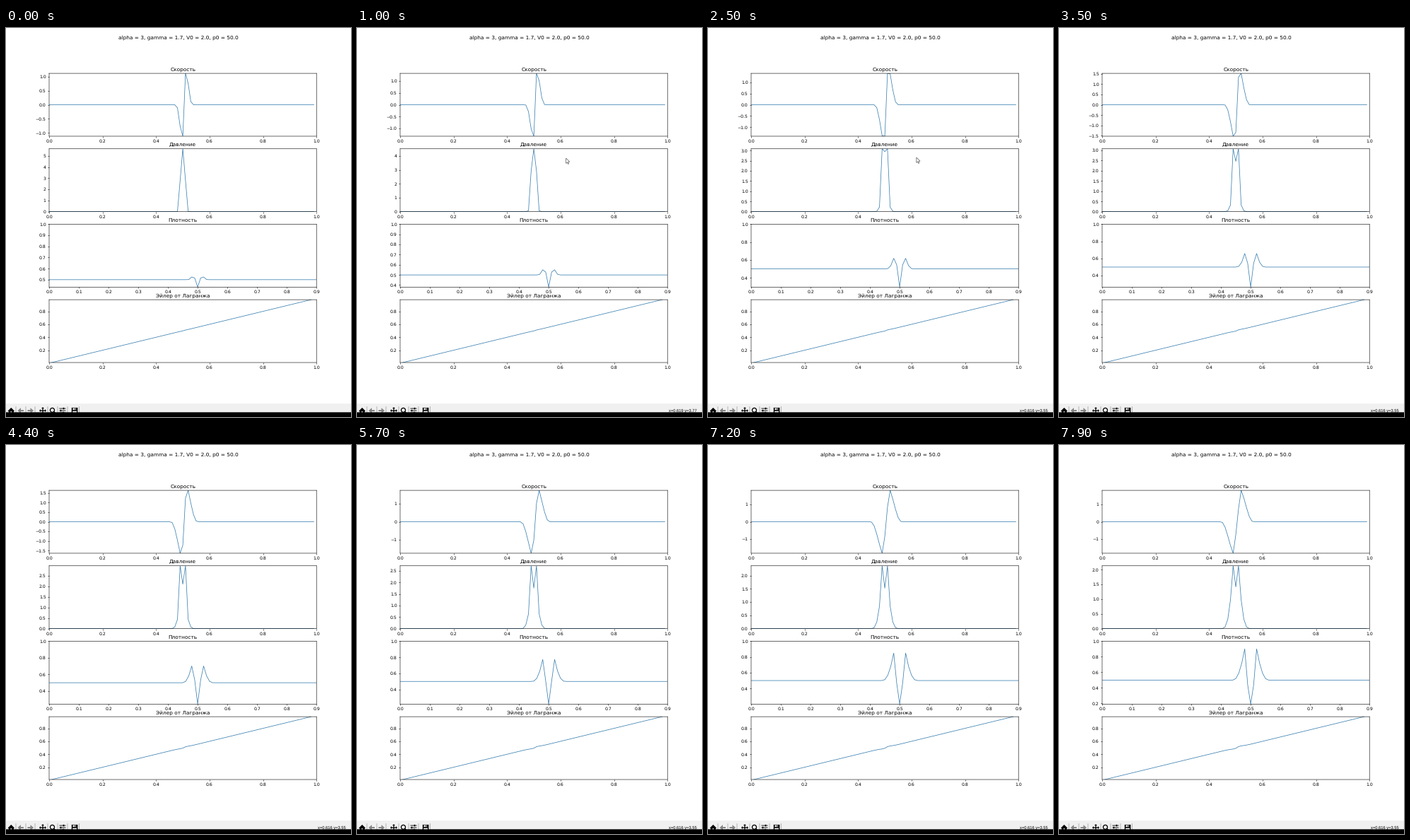
Animation, 488 px wide and 550 px high, one loop 8 s. Source, as a matplotlib script:

```python
import numpy as np
import matplotlib.pyplot as plt
from matplotlib.animation import FuncAnimation
from matplotlib.patches import Circle, Polygon, Rectangle

W, H, DPI = 488, 550, 64
PLOT_H = 531                 # plot area above the toolbar
K = 44.04 / DPI              # scale of the default style sizes
STEP_MS, FRAMES = 100, 80

plt.rcParams.update({
    "font.family": "DejaVu Sans", "font.size": 10 * K, "text.hinting": "none",
    "axes.linewidth": 0.95 * K, "axes.titlepad": 6 * K, "lines.linewidth": 1.25 * K,
    "path.snap": False,
    **{f"{a}tick.major.{p}": v * K for a in "xy"
       for p, v in (("size", 3.5), ("pad", 3.5), ("width", 0.95))},
})

# Point explosion in a gas, in Lagrangian cells with artificial viscosity
CELLS, CENTRE = 100, 50
GAMMA, RHO0, VISCOSITY = 1.7, .5, 5.3
STRETCH = .034               # time step over cell width
PUSH = STRETCH / RHO0
WARM_UP, SHOWN = 4, 18
FIRST_MS, UPDATE_MS = 100, 455


def simulate():
    """States (velocity, pressure, density) for every shown solver step."""
    volume = np.ones(CELLS)
    velocity = np.zeros(CELLS + 1)
    pressure = np.zeros(CELLS)
    pressure[CENTRE - 1:CENTRE + 2] = 2.65, 7.2, 2.65

    def viscosity():
        squeeze = np.minimum(np.diff(velocity), 0)
        return VISCOSITY * RHO0 / volume * squeeze ** 2

    velocity[1:-1] -= PUSH / 2 * np.diff(pressure)
    states = []
    for _ in range(WARM_UP + SHOWN + 1):
        states.append((velocity[:-1].copy(), pressure, RHO0 / volume))
        grown = volume + STRETCH * np.diff(velocity)
        ratio = volume / grown
        pressure = (pressure * ratio ** GAMMA
                    + (GAMMA - 1) * viscosity() * np.log(ratio))
        volume = grown
        velocity[1:-1] -= PUSH * np.diff(pressure + viscosity())
    return states[WARM_UP:]


STATES = simulate()
GRID = np.arange(CELLS) / CELLS

fig = plt.figure(figsize=(W / DPI, H / DPI), dpi=DPI, facecolor="white")
axes = fig.subplots(4, 1)
fig.subplots_adjust(left=.125, right=.9, hspace=.2,
                    top=1 - 64.1 / H, bottom=1 - 473 / H)
fig.suptitle("alpha = 3, gamma = 1.7, V0 = 2.0, p0 = 50.0",
             y=1 - .02 * PLOT_H / H)

lines = []
for ax, title, right in zip(
        axes, ("Скорость", "Давление", "Плотность", "Эйлер от Лагранжа"),
        (1, 1, .9, 1)):
    ax.set_title(title)
    ax.set_xlim(0, right)
    lines += ax.plot([], [], color="#397fb0")

# Pixel-space layer for the toolbar and pointer
stage = fig.add_axes([0, 0, 1, 1], zorder=5)
stage.set(xlim=(0, W), ylim=(H, 0))
stage.axis("off")


def px(size):
    return size * 72 / DPI


def rect(x, y, w, h, color):
    stage.add_patch(Rectangle((x, y), w, h, fc=color, lw=0))


def shape(points, color="black"):
    stage.add_patch(Polygon(points, fc=color, lw=0))


def stroke(xs, ys, color="black", width=1.0):
    stage.plot(xs, ys, color=color, lw=px(width), solid_capstyle="butt")


def toolbar():
    rect(0, PLOT_H, W, H - PLOT_H, "#f0f0f0")
    for x in (14, 28, 41, 59, 73, 87, 103.5):
        stroke([x, x], [535, 544], "#8c8c8c", .6)
    # home
    shape([(2.5, 541.5), (7.3, 536.8), (12, 541.5), (11, 542), (10.5, 546),
           (4, 546), (3.7, 542)])
    rect(6.5, 542, 1.6, 3, "#f0f0f0")
    # back and forward
    for x, d in ((21, 1), (34.5, -1)):
        shape([(x - 4.5 * d, 541), (x, 537), (x, 540), (x + 4 * d, 540),
               (x + 4 * d, 542), (x, 542), (x, 545)], "#858585")
    # pan
    stroke([48, 56], [541, 541], width=1.3)
    stroke([52, 52], [537, 545], width=1.3)
    for dx, dy in ((1, 0), (-1, 0), (0, 1), (0, -1)):
        shape([(52 + 5 * dx, 541 + 5 * dy),
               (52 + 3 * dx + 2 * dy, 541 + 3 * dy + 2 * dx),
               (52 + 3 * dx - 2 * dy, 541 + 3 * dy - 2 * dx)])
    # zoom
    stage.add_patch(Circle((65.5, 540.3), 3, fill=False, ec="black", lw=px(1.3)))
    stroke([67.5, 70.5], [542.3, 545.5], width=1.6)
    # sliders
    for y, knob in ((538, 81.5), (541, 77.5), (544, 81)):
        stroke([75.5, 84.5], [y, y], width=.9)
        rect(knob - .8, y - 1.3, 1.6, 2.6, "black")
    # save
    rect(92.8, 536.8, 8.6, 9, "black")
    rect(94.5, 537.5, 4.6, 2.4, "#f0f0f0")
    rect(94.2, 541.6, 5.8, 3.5, "#f0f0f0")
    rect(97.2, 537.8, 1.2, 1.8, "black")
    stage.add_patch(Rectangle((0, 543.3), W, 7, fc="black", lw=0, zorder=4))


toolbar()
status = stage.text(481, 541, "", ha="right", va="center",
                    family="Liberation Sans", fontsize=px(5.8))

ARROW = np.array([(0, 0), (0, 7.4), (1.7, 5.9), (2.9, 8.4), (4, 7.9),
                  (2.9, 5.4), (5.2, 5.2)])
pointer = Polygon(ARROW, fc="white", ec="#6c6c6c", lw=px(.8))
stage.add_patch(pointer)


def draw_pointer(ms):
    pointer.set_visible(700 <= ms < 3000)
    times = [700, 900, 1100, 1200]
    x = np.interp(ms, times, [425, 295.6, 295.6, 294.8])
    y = np.interp(ms, times, [112, 184, 184, 183])
    pointer.set_xy(ARROW + (x, y))
    status.set_text("" if ms < 800 else
                    "x=0.619 y=3.77" if ms < 1200 else "x=0.616 y=3.55")


def draw(i):
    ms = i * STEP_MS
    step = max(0, (ms - FIRST_MS) // UPDATE_MS + 1)
    speed, pressure, density = STATES[min(step, SHOWN)]
    # positions follow from the cell volumes
    position = np.r_[0, np.cumsum(RHO0 / density) / CELLS][:99]
    curves = (speed, pressure, density, position)
    limits = ((speed.min(), speed.max()), (0, pressure.max()),
              (density.min(), 1), (.01, .98))
    for ax, line, ys, lim in zip(axes, lines, curves, limits):
        line.set_data(GRID[:len(ys)], ys)
        ax.set_ylim(lim)
    draw_pointer(ms)
    return lines


anim = FuncAnimation(fig, draw, frames=FRAMES, interval=STEP_MS,
                     repeat=True, repeat_delay=0, blit=False)
plt.show()
```
